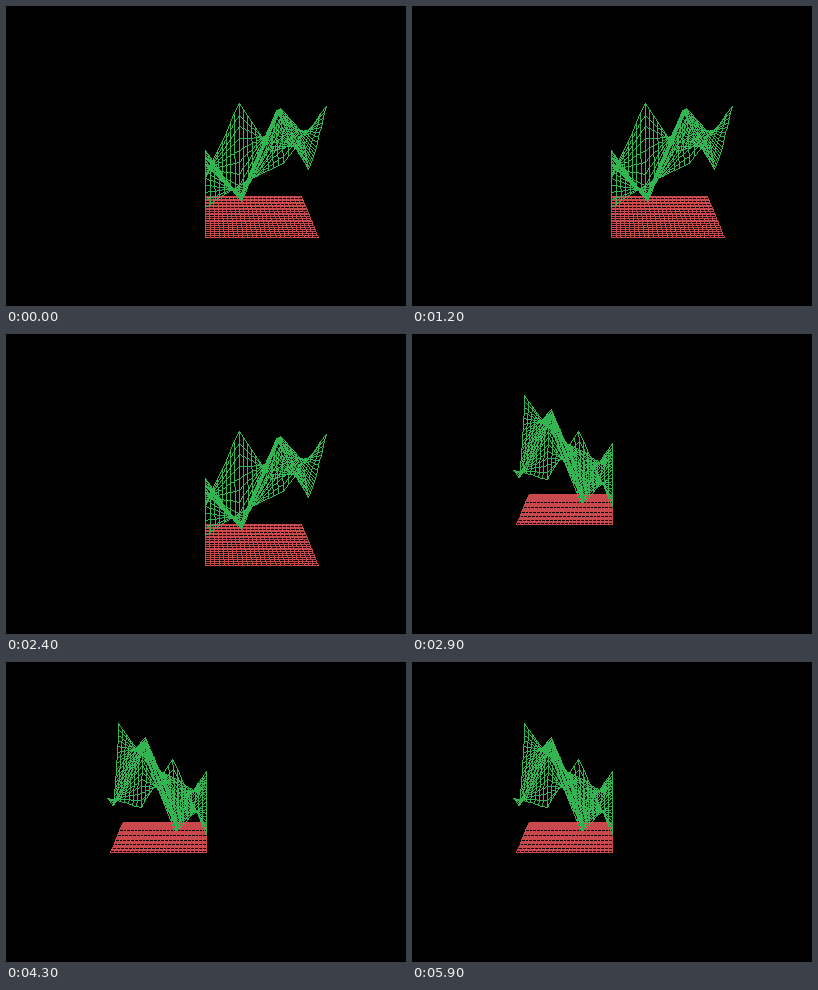
A matplotlib script for the animation above (6000 ms loop, 400 by 300 pixels).

```python
import numpy as np
import matplotlib.pyplot as plt
from matplotlib.animation import FuncAnimation

W, H, DPI = 400, 300, 100
FRAMES, INTERVAL = 60, 100
CELLS = 24

GREEN = (50, 180, 80)
RED = (200, 72, 76)

# Camera: focal length, distance, drop of the floor below the view axis, pitch
FOCAL, DIST, DROP = 603, 6.30, 0.42
PITCH_SIN, PITCH_COS = 0.299, 0.954

# Terrain heights; one row per step in x, one column per step in z
KNOTS = np.array([
    [0.20, 0.45, 0.70, 0.286],
    [0.99, 0.11, 0.21, 0.517],
    [0.49, 0.99, 1.087, 0.688],
    [0.586, 0.404, 0.73, 1.183],
])

ticks = np.linspace(0, 1, CELLS + 1)
# The near-left corner lies just past the pivot
gx, gz = np.meshgrid(ticks - 0.004, ticks, indexing="ij")


def bilinear(knots):
    at = np.linspace(0, 1, len(knots))
    rows = np.array([np.interp(ticks, at, row) for row in knots])
    return np.array([np.interp(ticks, at, col) for col in rows.T]).T


def project(x, z, height):
    depth = DIST - PITCH_COS * z - PITCH_SIN * height
    px = W / 2 + FOCAL * x / depth
    py = H / 2 + FOCAL * (DROP + PITCH_SIN * z - PITCH_COS * height) / depth
    return np.stack([px, py], axis=-1).astype(int)


def draw_line(image, start, end, color):
    """Plot a hard-edged line one pixel wide."""
    steps = np.abs(end - start).max() + 1
    x, y = np.rint(np.linspace(start, end, steps)).astype(int).T
    image[y, x] = color


def draw_mesh(image, height, angle, color):
    c, s = np.cos(angle), np.sin(angle)
    pts = project(gx * c - gz * s, gx * s + gz * c, height)
    for lines in (pts, pts.transpose(1, 0, 2)):
        for line in lines:
            for start, end in zip(line, line[1:]):
                draw_line(image, start, end, color)


def render(angle):
    image = np.zeros((H, W, 3), np.uint8)
    draw_mesh(image, np.zeros_like(gx), angle, RED)
    draw_mesh(image, bilinear(KNOTS), angle, GREEN)
    return image


# The model makes half a turn on every step, so two poses alternate
poses = [render(0), render(np.pi)]

fig = plt.figure(figsize=(W / DPI, H / DPI), dpi=DPI, facecolor="black")
ax = fig.add_axes([0, 0, 1, 1])
ax.axis("off")
screen = ax.imshow(poses[0], interpolation="nearest", aspect="auto")


def draw(frame):
    screen.set_data(poses[frame % 2])
    return (screen,)


anim = FuncAnimation(fig, draw, frames=FRAMES, interval=INTERVAL,
                     repeat=True, repeat_delay=0)
plt.show()
```
